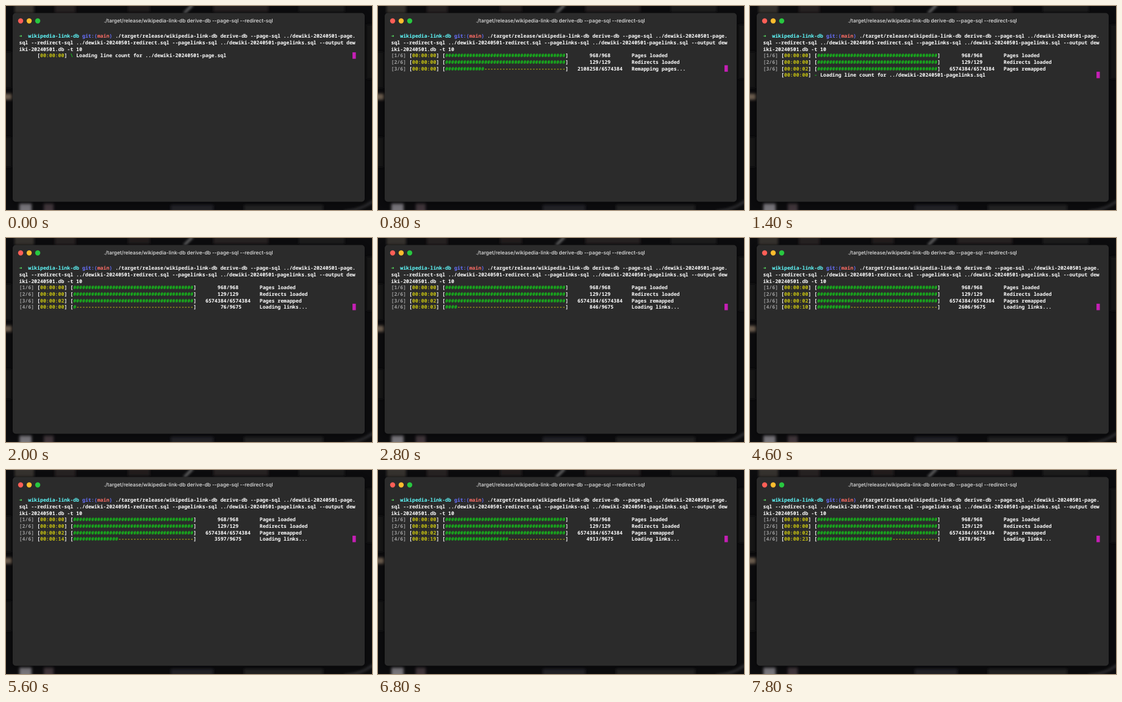
Animation of 600x335 px, one loop 8000 ms. Source, as an HTML page:

```html
<!DOCTYPE html>
<html lang="en">
<head>
<meta charset="utf-8">
<title>Terminal progress</title>
<style>
  html, body { margin: 0; width: 100%; height: 100%; overflow: hidden; background: #0d0d0f; }
  svg { display: block; width: 600px; height: 335px; }
  text { white-space: pre; text-rendering: geometricPrecision; }
  .term { font: 600 8.213px "Noto Sans Mono", "DejaVu Sans Mono", monospace; fill: #fff; }
  .title { font: 500 8.36px Inter, sans-serif; fill: #e2e2e2; text-anchor: middle; }
  .term .bold { font-weight: 800; }
  .term .arrow { fill: #5ffa68; }
  .term .cyan { fill: #60fdff; }
  .term .blue { fill: #6871ff; }
  .term .red { fill: #ff6e67; }
  .term .green { fill: #14c81a; }
  .term .yellow { fill: #c2be12; }
  .term .gray { fill: #9c9c9c; font-weight: 700; }
</style>
</head>
<body>
<svg viewBox="0 0 600 335">
  <defs>
    <filter id="soft" x="-50%" y="-50%" width="200%" height="200%"><feGaussianBlur stdDeviation="2"/></filter>
    <filter id="shadow" x="-10%" y="-10%" width="120%" height="120%"><feGaussianBlur stdDeviation="4"/></filter>
  </defs>
  <rect width="600" height="335" fill="#0c0c0e"/>
  <g filter="url(#soft)">
    <rect x="14" y="-4" width="32" height="16" fill="#35322f"/>
    <rect x="80" y="-4" width="34" height="16" fill="#252423"/>
    <rect x="200" y="-4" width="36" height="14" fill="#221f1e"/>
    <path d="M292 12L306 -2" stroke="#8a8a8a" stroke-width="3"/>
    <rect x="340" y="-4" width="90" height="14" fill="#252423"/>
    <rect x="480" y="-4" width="75" height="14" fill="#1c1c1c"/>
    <rect x="-4" y="75" width="14" height="60" fill="#171414"/>
    <rect x="-4" y="144" width="14" height="10" fill="#6a5b4e"/>
    <rect x="-4" y="215" width="14" height="50" fill="#191717"/>
    <rect x="590" y="30" width="14" height="90" fill="#171716"/>
    <rect x="22" y="324" width="20" height="15" fill="#77747a"/>
    <rect x="62" y="324" width="16" height="15" fill="#40343a"/>
    <rect x="270" y="326" width="70" height="12" fill="#242426"/>
    <rect x="390" y="326" width="130" height="12" fill="#222224"/>
    <path d="M555 337Q580 336 602 320" fill="none" stroke="#3a3a3c" stroke-width="3"/>
  </g>
  <rect x="10" y="13" width="579" height="311" rx="6" fill="#000" opacity=".4" filter="url(#shadow)"/>
  <rect x="11" y="11.5" width="577" height="310" rx="5" fill="#2b2b2b"/>
  <circle cx="24" cy="24.5" r="4.2" fill="#ff5f57"/>
  <circle cx="38" cy="24.5" r="4.2" fill="#febc2e"/>
  <circle cx="52" cy="24.5" r="4.2" fill="#28c840"/>
  <text class="title" x="299" y="27.3">./target/release/wikipedia-link-db derive-db --page-sql --redirect-sql</text>
  <g class="term" id="command"></g>
  <g class="term" id="output"></g>
  <rect id="cursor" x="568" width="5.5" height="10.6" fill="#c41fb4"/>
</svg>
<script>
const LOOP = 8000, STEP = 200, BAR = 40;
const COL = 4.928, ROW = 10.62, LEFT = 21.5, BASE = 52.4;
const command = document.getElementById('command');
const output = document.getElementById('output');
const cursor = document.getElementById('cursor');

function put(group, row, col, text, style = '') {
  const node = document.createElementNS('http://www.w3.org/2000/svg', 'text');
  node.setAttribute('x', LEFT + col * COL);
  node.setAttribute('y', BASE + row * ROW);
  node.setAttribute('class', style);
  node.textContent = text;
  group.append(node);
}

put(command, 0, 0, '➜', 'bold arrow');
put(command, 0, 3, 'wikipedia-link-db', 'bold cyan');
put(command, 0, 21, 'git:(', 'bold blue');
put(command, 0, 26, 'main', 'bold red');
put(command, 0, 30, ')', 'bold blue');
put(command, 0, 32, './target/release/wikipedia-link-db derive-db --page-sql ../dewiki-20240501-page.');
put(command, 1, 0, 'sql --redirect-sql ../dewiki-20240501-redirect.sql --pagelinks-sql ../dewiki-20240501-pagelinks.sql --output dew');
put(command, 2, 0, 'iki-20240501.db -t 10');

// Each stage: keys are [time, count] points; the clock runs at four times real speed.
const stages = [
  { count: 'page', start: 0, end: 300 },
  { id: 1, total: 968, keys: [[300, 0], [500, 968]], busy: 'Loading pages...', done: 'Pages loaded' },
  { id: 2, total: 129, keys: [[500, 0], [605, 129]], busy: 'Loading redirects...', done: 'Redirects loaded' },
  { id: 3, total: 6574384, keys: [[605, 0], [800, 2108258], [1213, 6574384]], busy: 'Remapping pages...', done: 'Pages remapped' },
  { count: 'pagelinks', start: 1213, end: 1925 },
  { id: 4, total: 9675, keys: [[1925, 0], [2000, 76], [3600, 1615], [5600, 3597], [6800, 4913], [7800, 5878], [8000, 6070]], busy: 'Loading links...' }
];
for (const s of stages) {
  if (s.keys) {
    s.start = s.keys[0][0];
    s.end = s.keys.at(-1)[0];
  }
}

function valueAt(keys, t) {
  const i = keys.findIndex(key => key[0] > t);
  if (i < 0) return keys.at(-1)[1];
  const [t0, v0] = keys[i - 1], [t1, v1] = keys[i];
  return Math.round(v0 + (v1 - v0) * (t - t0) / (t1 - t0));
}

function drawClock(row, col, ms) {
  const seconds = String(Math.floor(ms / 250)).padStart(2, '0');
  put(output, row, col, '[');
  put(output, row, col + 1, '00:00:' + seconds, 'yellow');
  put(output, row, col + 9, ']');
}

function drawCount(s, row, t) {
  drawClock(row, 6, t - s.start);
  put(output, row, 17, '\\|/-'[t / STEP % 4], 'green');
  put(output, row, 19, `Loading line count for ../dewiki-20240501-${s.count}.sql`);
}

function drawBar(s, row, t) {
  const done = t >= s.end;
  const pos = valueAt(s.keys, t);
  const filled = Math.min(BAR, Math.ceil(pos / s.total * BAR));
  put(output, row, 0, `[${s.id}/6]`, 'gray');
  drawClock(row, 6, Math.min(t, s.end) - s.start);
  put(output, row, 17, '[');
  put(output, row, 18, '#'.repeat(filled), 'green');
  put(output, row, 18 + filled, '-'.repeat(BAR - filled), 'yellow');
  put(output, row, 58, ']');
  put(output, row, 62, `${String(pos).padStart(7)}/${s.total}`);
  put(output, row, 80, done ? s.done : s.busy);
}

let shown = -1;
function render(now) {
  const t = Math.floor(now % LOOP / STEP) * STEP;
  if (t !== shown) {
    shown = t;
    output.replaceChildren();
    let row = 3;
    for (const s of stages) {
      if (t < s.start || (s.count && t >= s.end)) continue;
      (s.count ? drawCount : drawBar)(s, row++, t);
    }
    cursor.setAttribute('y', BASE + (row - 1) * ROW - 8.2);
  }
  requestAnimationFrame(() => render(performance.now()));
}
render(0);
</script>
</body>
</html>
```
